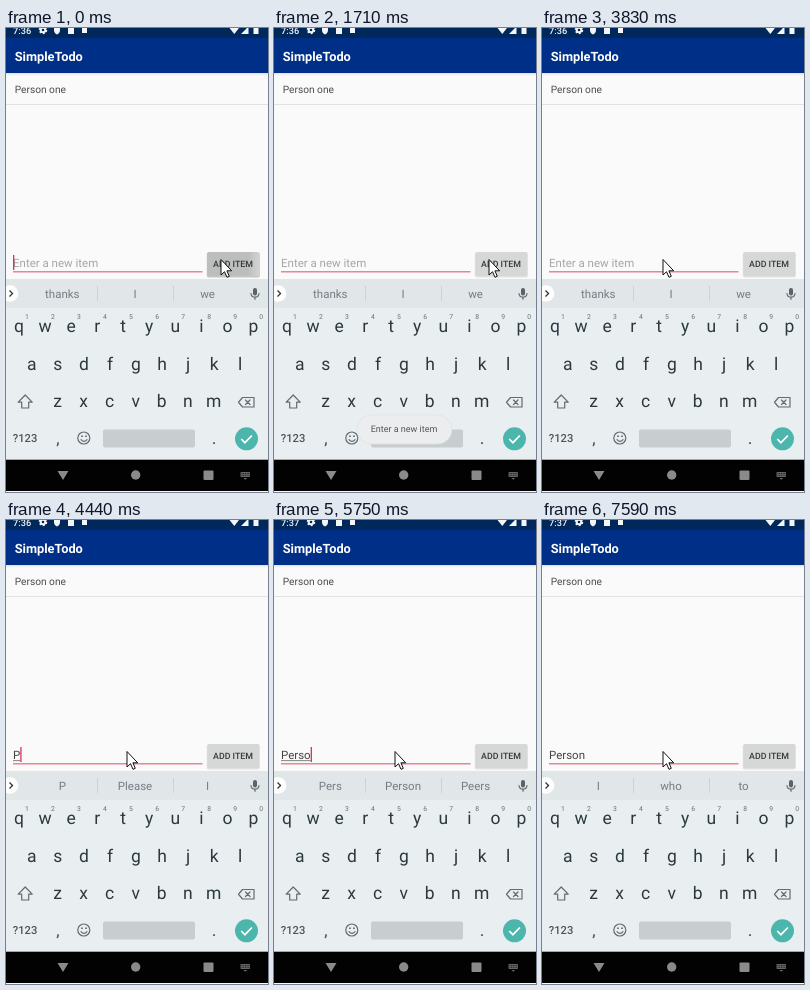
Animation, 262 px wide and 464 px high, one loop 8 s. Source, as an HTML page:

```html
<!DOCTYPE html>
<html lang="en">
<head>
<meta charset="utf-8">
<title>Todo list</title>
<style>
html, body { margin: 0; width: 100%; height: 100%; overflow: hidden; background: #fafafa; }
svg { display: block; width: 262px; height: 464px; }
text { font-family: Roboto, "Noto Sans", sans-serif; white-space: pre; text-rendering: geometricPrecision; }
.mid { text-anchor: middle; }
.medium { font-weight: 500; }
.bold { font-weight: 700; }
.line { fill: none; stroke: #626b71; stroke-width: 1.2; stroke-linejoin: round; stroke-linecap: round; }
</style>
</head>
<body>
<svg id="stage" viewBox="0 0 262 464">
  <defs>
    <linearGradient id="shade" x1="0" y1="0" x2="0" y2="1">
      <stop offset="0" stop-color="#000" stop-opacity=".1"/>
      <stop offset="1" stop-color="#000" stop-opacity="0"/>
    </linearGradient>
    <linearGradient id="ripple">
      <stop offset=".78" stop-color="#bcbdbd"/>
      <stop offset=".98" stop-color="#d0d1d1"/>
    </linearGradient>
  </defs>
  <rect width="262" height="464" fill="#fafafa"/>

  <!-- Status bar and title -->
  <rect width="262" height="10" fill="#00285a"/>
  <rect y="10" width="262" height="35" fill="#002f87"/>
  <rect y="45" width="262" height="3" fill="url(#shade)"/>
  <g fill="#f4f6fa">
    <text id="clock" class="medium" x="7" y="5.5" font-size="9.2"></text>
    <circle cx="37" cy="2" r="2.300" fill="none" stroke="#f4f6fa" stroke-width="2"/>
    <circle cx="37" cy="2" r="3.700" fill="none" stroke="#f4f6fa" stroke-width="1.200" stroke-dasharray="1.940"/>
    <path d="M48 0h6v2q0 3-3 4.500q-3-1.500-3-4.500z"/>
    <path d="M62 0h6v6h-6z"/>
    <rect x="76" y="0" width="5" height="5"/>
    <path d="M223.500 0h9.500l-4.700 6z"/>
    <path d="M235 6l6-6h1.500v6z"/>
    <path d="M247.500 0h5v6h-5z"/>
  </g>
  <text class="bold" x="8.700" y="33" font-size="12.8" fill="#fff">SimpleTodo</text>

  <!-- List, field and button -->
  <text x="8.700" y="65" font-size="10.2" fill="#4c4c4c">Person one</text>
  <rect y="76" width="262" height="1" fill="#e2e2e2"/>
  <rect x="7" y="243" width="189.500" height="1.500" fill="#ea8497"/>
  <text id="field" x="7" y="238.900" font-size="11.5"></text>
  <rect id="composing" x="7" y="240.300" height=".8" fill="#666"/>
  <rect id="caret" y="227" width="1.300" height="15" fill="#d8305f"/>
  <rect id="shadow" x="200.800" y="224.500" width="53" height="25" rx="2" fill="#000"/>
  <rect id="button" x="201.300" y="224" width="52" height="24" rx="1.500"/>
  <text class="medium mid" x="227" y="239.200" font-size="8.8" fill="#383838">ADD ITEM</text>

  <!-- Keyboard -->
  <rect y="251" width="262" height="182" fill="#e9eef1"/>
  <rect y="251" width="262" height="29" fill="#e1e6e9"/>
  <path d="M91.500 258v15M167.500 258v15" stroke="#ccd2d5"/>
  <circle cx="4" cy="265.500" r="8.300" fill="#fff"/>
  <path d="M3.500 262.500l3 3-3 3" fill="none" stroke="#333" stroke-width="1.300"/>
  <g id="hints" fill="#737d83"></g>
  <rect x="247" y="260" width="4" height="7.500" rx="2" fill="#59636a"/>
  <path class="line" d="M245 265.500q.3 3.700 4 3.700t4-3.700M249 269.500v1.800"/>
  <g id="keys" fill="#2b393f"></g>
  <path id="shift" class="line" d="M19.200 367l7 7.200h-3.500v5.800h-7v-5.800h-3.500z"/>
  <path class="line" d="M236.500 369.500h11.500v9.500h-11.500l-4-4.750zM239.500 372l4.500 4.500m0-4.500l-4.500 4.500"/>
  <g class="mid" fill="#4b555b">
    <text class="medium" x="19" y="414" font-size="11.2">?123</text>
    <text class="medium" x="52" y="416" font-size="15">,</text>
    <text class="medium" x="208" y="415.700" font-size="15">.</text>
  </g>
  <circle class="line" cx="77.800" cy="410" r="6"/>
  <path class="line" d="M75 411.700q3 3.500 6 0"/>
  <path d="M75.200 407.500h1.600v1.600h-1.600zM79.200 407.500h1.600v1.600h-1.600z" fill="#59636a"/>
  <rect x="97" y="401.500" width="92" height="18" rx="2" fill="#c8cdd0"/>
  <circle cx="240.500" cy="410.800" r="11.500" fill="#4db6ac"/>
  <path d="M235.200 411l3.700 3.700 7-7.200" fill="none" stroke="#fff" stroke-width="1.700"/>

  <!-- Navigation bar -->
  <rect y="431.700" width="262" height="31.300" fill="#020202"/>
  <g fill="#8a8a8a">
    <path d="M51.500 443h11l-5.500 9z"/>
    <circle cx="129.700" cy="447" r="4.700"/>
    <rect x="197.500" y="442.500" width="10" height="9.500" rx="1"/>
    <g fill="#666">
      <rect x="234.500" y="444" width="9.500" height="5" rx=".7"/>
      <path d="M237.300 450h4l-2 1.800z"/>
    </g>
    <path d="M235.500 445.500h8M235.500 447.300h8" stroke="#020202" stroke-width=".7" stroke-dasharray="1 .7"/>
  </g>

  <g id="toast">
    <rect x="83" y="387" width="95" height="29" rx="14.500" fill="#ebedee" stroke="#dcdfe1" stroke-width=".6"/>
    <text class="mid" x="130" y="404.200" font-size="9" fill="#555">Enter a new item</text>
  </g>
  <path id="mouse" d="M.5 .5v15.500l3.500-3.300 2.500 5.600 2.300-1-2.400-5.500h4.800z" fill="#fff" stroke="#111" stroke-linejoin="round"/>
</svg>
<script>
const LOOP = 8000;
const $ = id => document.getElementById(id);

function addText(parent, x, y, size, content = "") {
  const node = document.createElementNS("http://www.w3.org/2000/svg", "text");
  node.setAttribute("class", "mid");
  node.setAttribute("x", x);
  node.setAttribute("y", y);
  node.setAttribute("font-size", size);
  node.textContent = content;
  parent.appendChild(node);
  return node;
}

function set(id, attrs) {
  for (const name in attrs) $(id).setAttribute(name, attrs[name]);
}

const hints = [56.3, 129, 201.5].map(x => addText($("hints"), x, 269.5, 11.5));
const keys = [];
[["qwertyuiop", 13, 304], ["asdfghjkl", 25.8, 341.5], ["zxcvbnm", 51.5, 379]].forEach(([row, left, y]) => {
  [...row].forEach((letter, i) => keys.push([letter, addText($("keys"), left + i * 26.05, y, 17.5)]));
});
for (let i = 0; i < 10; i++) {
  addText($("keys"), 20.8 + i * 26.05, 291, 6.8, (i + 1) % 10).setAttribute("fill", "#667178");
}

// Each track holds [start time, value] steps.
const tracks = {
  text: [[0, ""], [4290, "P"], [4560, "Pe"], [5200, "Per"], [5320, "Pers"], [5750, "Perso"], [5900, "Person"], [7140, "Person "]],
  hints: [[0, "thanks I we"], [4440, "P Please I"], [4680, "Pe People Per"], [5320, "Pers Person Peers"],
    [6050, "Person Person Personally"], [7140, "I who to"]],
  caret: [[0, 1], [790, 0], [1210, 1], [1710, 0], [2290, 1], [2840, 0], [3400, 1], [3830, 0], [4290, 1], [6460, 0], [6860, 1], [7590, 0]],
  toast: [[0, 0], [1090, .3], [1210, .7], [1330, 1], [2290, .7], [2410, .25], [2550, 0]],
  mouse: [[0, 214.5], [2140, 212], [2290, 165], [2410, 120.5]],
  button: [[0, "url(#ripple)"], [120, "#bcbdbd"], [520, "#c8c9c9"], [790, "#d6d7d7"]],
  shadow: [[0, .22], [790, .1]],
  upper: [[0, false], [4140, true], [4440, false]],
  clock: [[0, "7:36"], [5200, "7:37"]]
};

function at(name, t) {
  let value;
  for (const [start, v] of tracks[name]) if (t >= start) value = v;
  return value;
}

function draw(t) {
  const text = at("text", t);
  const upper = at("upper", t);
  const field = $("field");
  field.textContent = text || "Enter a new item";
  field.setAttribute("fill", text ? "#444" : "#a6a6a6");
  const width = text ? field.getComputedTextLength() : 0;
  set("caret", { x: 7 + width, opacity: at("caret", t) });
  set("composing", { width: text.endsWith(" ") ? 0 : width });

  at("hints", t).split(" ").forEach((word, i) => hints[i].textContent = word);
  keys.forEach(([letter, node]) => node.textContent = upper ? letter.toUpperCase() : letter);
  $("shift").style.fill = upper ? "#59636a" : "none";

  $("clock").textContent = at("clock", t);
  set("button", { fill: at("button", t) });
  set("shadow", { opacity: at("shadow", t) });
  set("toast", { opacity: at("toast", t) });
  set("mouse", { transform: `translate(${at("mouse", t)} 231)` });
}

const begin = performance.now();
function tick() {
  draw((performance.now() - begin) % LOOP);
  requestAnimationFrame(tick);
}
tick();
</script>
</body>
</html>
```
